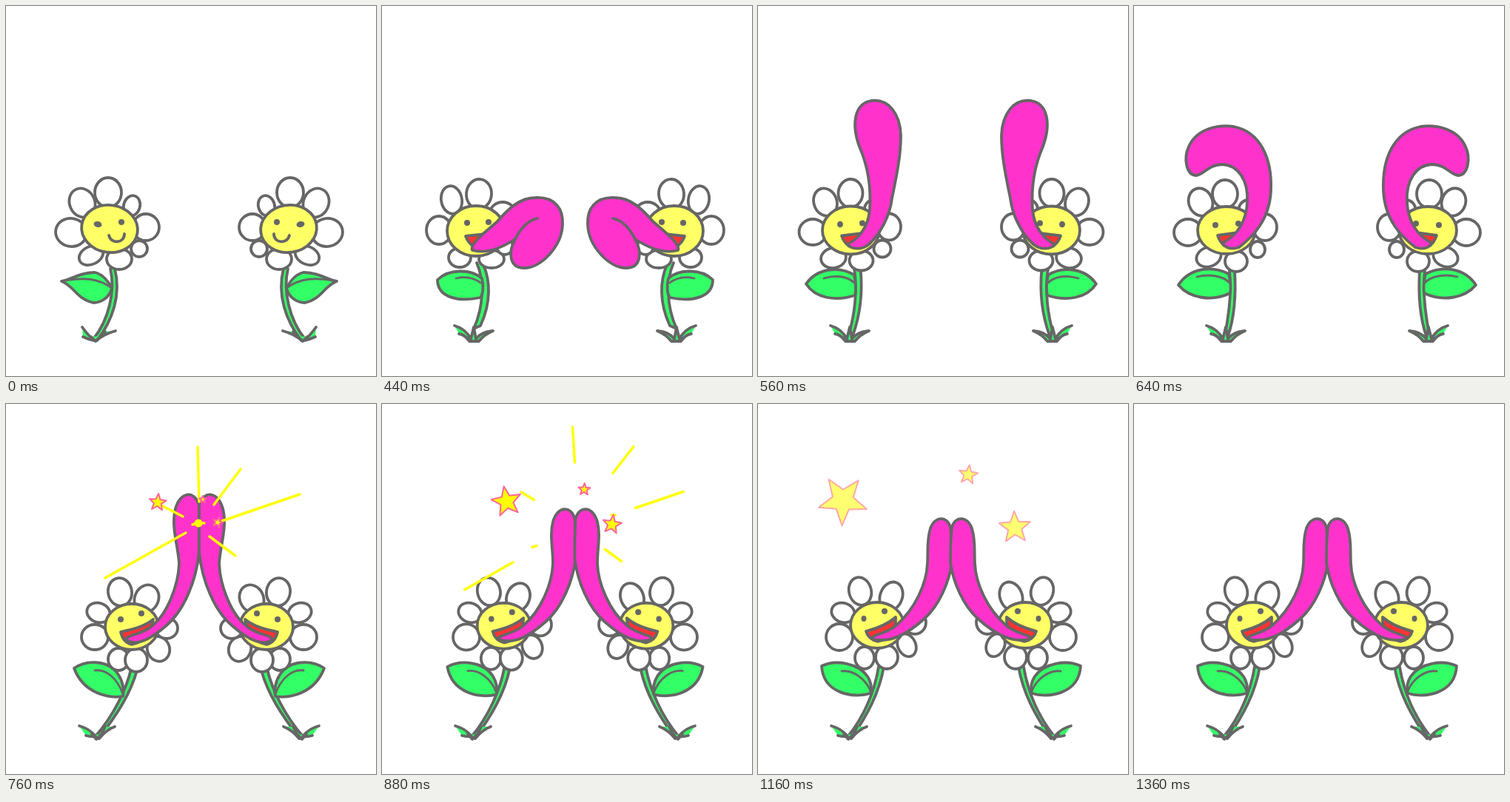
These frames come from a looping animation (500x500 px, 2080 ms). An HTML page with a canvas:

```html
<!DOCTYPE html>
<html lang="en">
<head>
<meta charset="utf-8">
<title>High-five flowers</title>
<style>
html, body { margin: 0; width: 100%; height: 100%; overflow: hidden; background: #fff; }
canvas { display: block; width: 100%; height: 100%; }
</style>
</head>
<body>
<canvas id="stage" width="500" height="500"></canvas>
<script>
const ctx = document.getElementById('stage').getContext('2d');
const LOOP = 2080, STEP = 40, MIRROR = 522;
const INK = '#666', GREEN = '#33ff66', YELLOW = '#ffff66', PINK = '#ff33cc', RED = '#ff3333';

// Ellipses are "x y rx ry degrees", separated by commas; the rest are path strings.
const smallGrass = 'M103 434Q111 445 119 452Q112 451 104 447M148 439Q133 443 121 453L134 440M115 447L121 453L128 446';
const tallGrass = 'M98 432Q113 436 120 450L124 434L127 450Q134 440 150 439Q138 444 131 453L118 453Q112 444 104 443';
const lowGrass = 'M99 435Q112 438 121 449Q114 450 108 448M147 436Q136 440 126 452L134 436M116 446L122 453L128 447';

const smiling = {
  petals: '138 252 18 20 0,103 266 17 20 -25,88 306 21 19 10,115 337 17 12 -25,153 342 17 14 0,180 328 11 11 0,189 299 18 18 0,170 270 11 14 15',
  face: '140 301 38 32 8',
  eyes: '124 295 5.5 4 10,156 292 4 4 0',
  smile: 'M139 310C142 322 160 321 160 308',
  stem: 'M141 355C148 385 139 424 118 450L123 452C144 425 156 390 147 355',
  leaf: 'M75 372C86 371 98 360 120 360C130 362 138 372 143 381C140 395 127 401 118 401C95 396 92 378 75 372Z',
  vein: 'M80 371C104 367 123 367 143 381',
  grass: smallGrass
};
const lickingOut = {
  petals: '131 254 17 20 5,94 262 14 19 -10,77 303 17 19 0,105 340 15 13 0,148 342 17 12 0,166 325 11 11 0,174 300 14 15 0,163 280 17 15 0',
  face: '127 304 39 34 0',
  eyes: '115 293 4 4 0,144 292 4 4 0',
  mouth: 'M113 311L150 307L124 325Q116 320 113 311Z',
  tongue: 'M122 330C118 322 140 305 155 292C170 275 185 259 208 259C235 258 245 275 244 295C243 325 215 354 192 354C172 354 170 333 180 315C160 328 140 335 122 330Z',
  crease: 'M180 315C186 303 196 290 210 287',
  stem: 'M128 347C138 370 138 405 124 436L133 432C148 400 146 370 137 350',
  leaf: 'M75 370C90 355 120 355 135 368C138 380 136 390 133 394C105 400 75 395 75 370Z',
  vein: 'M100 368C113 365 125 368 133 374',
  grass: tallGrass
};
const lickingUp = {
  petals: '127 252 16 19 5,92 265 15 19 -20,75 305 18 17 0,103 342 17 14 0,141 343 17 13 0,169 327 13 12 0,177 298 16 18 0,158 275 12 13 0',
  face: '126 303 38 33 0',
  eyes: '112 294 4 4.5 0,141 293 4 4 0',
  mouth: 'M113 311L142 308L124 325Q116 320 113 311Z',
  tongue: 'M122 324C130 318 145 308 148 285C152 250 155 215 178 199C200 183 215 190 230 208C243 222 247 240 244 255C238 268 222 267 216 256C211 240 200 234 190 245C180 260 178 290 160 312C148 328 130 332 122 324Z',
  stem: 'M131 352C137 380 134 410 123 440L129 445C142 410 145 380 141 353',
  leaf: 'M70 374C85 354 115 352 132 365C134 378 134 388 132 394C105 399 80 395 70 374Z',
  vein: 'M93 370C108 364 122 366 131 374',
  grass: tallGrass
};
const woundBack = {
  petals: '123 254 17 19 0,90 265 16 19 -20,73 306 19 18 0,101 339 17 13 -20,138 345 15 14 0,167 329 10 11 0,177 299 16 18 0,155 274 13 12 0',
  face: '125 303 39 32 0',
  eyes: '110 296 4 4 0,141 294 4 4 0',
  mouth: 'M113 310L142 306L122 324Q116 319 113 310Z',
  tongue: 'M120 320C140 310 152 290 153 265C155 235 140 215 120 214C100 214 95 228 84 229C70 228 67 205 74 190C85 165 115 160 135 163C170 170 187 205 185 250C183 290 160 312 142 326C130 330 122 326 120 320Z',
  stem: 'M129 358C133 390 126 430 122 448L127 446C136 420 138 390 136 357',
  leaf: 'M60 377C75 354 105 350 128 362C131 375 131 383 130 388C105 400 75 395 60 377Z',
  vein: 'M85 366C100 362 120 364 129 374',
  grass: tallGrass
};
const clapping = {
  petals: '154 254 16 19 -10,125 282 16 13 20,120 315 18 17 0,152 345 14 15 0,176 346 15 16 0,206 331 15 17 -20,217 303 15 14 0,190 263 16 19 25',
  face: '170 301 36 31 0',
  eyes: '155 291 4 4 0,183 283 4 4 0',
  mouth: 'M155 308C170 305 187 301 199 291C196 308 186 322 170 325Q158 322 155 308Z',
  tongue: 'M162 318C165 311 184 312 197 300C218 284 233 245 234 215C232 190 224 168 228 146C233 118 255 115 261 137C261 155 261 180 261 200C257 240 240 280 216 300C195 318 175 329 162 318Z',
  stem: 'M169 358C163 385 145 422 120 450L125 452C150 420 168 392 177 360',
  leaf: 'M92 357C110 345 140 346 152 366C158 375 160 388 158 395C140 398 105 392 92 357Z',
  vein: 'M120 360C135 358 150 370 158 392',
  grass: lowGrass
};
const resting = {
  petals: '138 253 15 19 -15,115 282 16 13 20,110 315 18 18 0,144 343 13 15 0,174 342 15 16 0,201 326 12 16 -25,212 295 15 16 0,180 260 15 20 20',
  face: '161 299 36 31 0',
  eyes: '143 290 3.5 4 0,171 280 4 4 0',
  mouth: 'M146 307C158 304 175 298 186 288C187 305 178 318 162 321Q149 318 146 307Z',
  tongue: 'M153 317C155 311 173 311 187 299C212 277 228 243 229 215C230 195 228 184 233 168C239 151 256 151 260 167C262 182 262 200 262 215C258 241 245 272 225 290C205 308 180 325 153 317Z',
  stem: 'M163 355C158 385 145 420 121 450L126 452C148 420 164 390 170 355',
  leaf: 'M86 354C105 345 135 350 148 368C153 376 154 384 152 391C130 398 88 392 86 354Z',
  vein: 'M113 361C127 359 145 370 152 388',
  grass: lowGrass
};

const lerp = (a, b, k) => a + (b - a) * k;
const NUMBER = /-?[\d.]+/g;
function mixText(a, b, k) {
  const goal = b.match(NUMBER);
  let i = 0;
  return a.replace(NUMBER, n => lerp(+n, +goal[i++], k));
}
function mixPose(a, b, k) {
  return Object.fromEntries(Object.keys(a).map(part => [part, mixText(a[part], b[part], k)]));
}

const swinging = {
  ...mixPose(lickingUp, woundBack, 0.5),
  tongue: 'M121 322C135 315 149 300 151 275C153 245 148 215 137 190C126 160 130 132 153 128C176 125 192 145 193 175C193 205 186 235 181 260C178 285 165 308 150 322C140 330 126 329 121 322Z'
};

function poseAt(t) {
  if (t < 440) return smiling;
  if (t < 480) return lickingOut;
  if (t < 560) return lickingUp;
  if (t < 640) return swinging;
  if (t < 760) return woundBack;
  return mixPose(clapping, resting, Math.min(1, (t - 760) / 200));
}

function paint(path, fill, stroke = INK) {
  if (!path) return;
  const shape = new Path2D(path);
  if (fill) { ctx.fillStyle = fill; ctx.fill(shape); }
  if (stroke) { ctx.strokeStyle = stroke; ctx.stroke(shape); }
}
function ellipses(list, fill, outlined = true) {
  for (const item of list.split(',')) {
    const [x, y, rx, ry, turn] = item.split(' ').map(Number);
    ctx.beginPath();
    ctx.ellipse(x, y, rx, ry, turn * Math.PI / 180, 0, 2 * Math.PI);
    ctx.fillStyle = fill;
    ctx.fill();
    ctx.strokeStyle = INK;
    if (outlined) ctx.stroke();
  }
}
function drawFlower(pose) {
  ctx.lineWidth = 3.8;
  paint(pose.stem, GREEN);
  paint(pose.grass, GREEN);
  paint(pose.leaf, GREEN);
  ctx.lineWidth = 2.8;
  paint(pose.vein);
  ctx.lineWidth = 3.8;
  ellipses(pose.petals, '#fff');
  ellipses(pose.face, YELLOW);
  ellipses(pose.eyes, INK, false);
  paint(pose.smile);
  paint(pose.mouth, RED);
  paint(pose.tongue, PINK);
  paint(pose.crease);
}

// Each streak: tail and head at the clap, then tail and head 240 ms later.
const streaks = [
  [261, 132, 259, 58, 260, 26, 256, 4],
  [281, 136, 317, 88, 343, 51, 363, 27],
  [292, 158, 397, 122, 393, 123, 417, 115],
  [275, 179, 310, 205, 328, 214, 337, 220],
  [243, 174, 134, 235, 111, 254, 89, 267],
  [239, 152, 210, 137, 172, 107, 166, 101],
  [258, 161, 252, 163, 160, 222, 154, 224],
  [262, 161, 268, 161, 358, 139, 363, 139]
];
// Each star: x, y, radius and turn at the clap, then 240 ms later.
const stars = [
  [205, 133, 12, 0.1, 140, 131, 28, -0.4],
  [286, 160, 7, 0.3, 330, 165, 18, 0.05],
  [266, 129, 5, 0, 279, 105, 11, 0.1]
];
const between = (row, k) => [0, 1, 2, 3].map(i => lerp(row[i], row[i + 4], k));

function drawStar([x, y, radius, turn]) {
  ctx.beginPath();
  for (let i = 0; i < 10; i++) {
    const angle = turn - Math.PI / 2 + i * Math.PI / 5;
    const r = i % 2 ? radius * 0.43 : radius;
    ctx.lineTo(x + r * Math.cos(angle), y + r * Math.sin(angle));
  }
  ctx.closePath();
  ctx.fillStyle = '#ffff00';
  ctx.fill();
  ctx.strokeStyle = '#ff6699';
  ctx.lineWidth = 2;
  ctx.stroke();
}
function drawSparks(p) {
  ctx.strokeStyle = '#ffff00';
  ctx.lineWidth = 3.5;
  for (const row of streaks) {
    const [tx, ty, hx, hy] = between(row, p);
    const ahead = (hx - tx) * (row[2] - row[0]) + (hy - ty) * (row[3] - row[1]);
    if (p > 1.42 || ahead <= 0) continue;
    ctx.beginPath();
    ctx.moveTo(tx, ty);
    ctx.lineTo(hx, hy);
    ctx.stroke();
  }
  const travel = (1 - (1 - p / 2.5) ** 2) / 0.64;
  ctx.globalAlpha = Math.min(1, (2.5 - p) / 1.5);
  stars.forEach(row => drawStar(between(row, travel)));
  ctx.globalAlpha = 1;
  if (p === 0) {
    ctx.beginPath();
    ctx.arc(260, 161, 5.5, 0, 2 * Math.PI);
    ctx.fillStyle = '#ffff00';
    ctx.fill();
  }
}

function draw(now) {
  const t = Math.floor(now % LOOP / STEP) * STEP;
  const pose = poseAt(t);
  ctx.fillStyle = '#fff';
  ctx.fillRect(0, 0, 500, 500);
  ctx.lineCap = ctx.lineJoin = 'round';
  drawFlower(pose);
  ctx.save();
  ctx.transform(-1, 0, 0, 1, MIRROR, 0);
  drawFlower(pose);
  ctx.restore();
  if (t >= 760 && t < 1360) drawSparks((t - 760) / 240);
}

let start;
function tick(now) {
  start ??= now;
  draw(now - start);
  requestAnimationFrame(tick);
}
draw(0);
requestAnimationFrame(tick);
</script>
</body>
</html>
```
